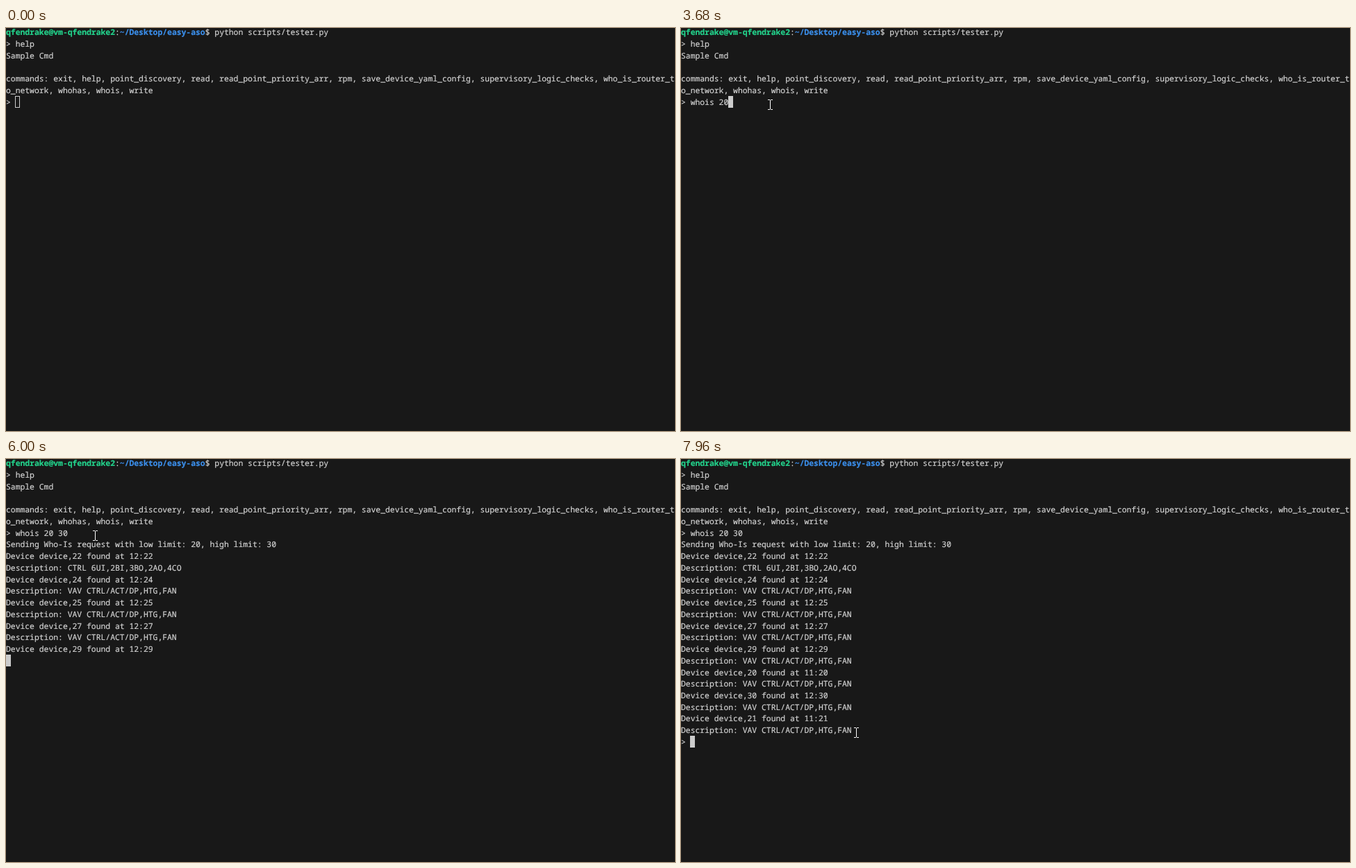
Write an HTML page that moves like this. It is 963 px wide and 581 px high and loops after 8000 ms.

```html
<!DOCTYPE html>
<html lang="en">
<head>
<meta charset="utf-8">
<title>Terminal session</title>
<style>
html, body { margin: 0; width: 100%; height: 100%; overflow: hidden; background: #181818; }
#stage { position: relative; width: 963px; height: 581px; overflow: hidden; }
#stage > * { position: absolute; left: 0; top: 0; }
#screen {
  margin: 0; top: -.7px; color: #d2d2d2; white-space: pre;
  font: 11.39px/16.73px "Noto Sans Mono", "DejaVu Sans Mono", monospace;
  text-rendering: geometricPrecision; font-variant-ligatures: none;
  -webkit-text-stroke: .2px;
}
#screen b { color: #23d18b; }
#screen b + b { color: #3b8eea; }
#selection { background: #264f78; }
#caret { box-sizing: border-box; border: 1px solid #ccc; }
#caret.focused { background: #ccc; }
</style>
</head>
<body>
<div id="stage">
  <div id="selection"></div>
  <div id="caret"></div>
  <pre id="screen"><b>qfendrake@vm-qfendrake2</b>:<b>~/Desktop/easy-aso</b>$ python scripts/tester.py
&gt; help
Sample Cmd

commands: exit, help, point_discovery, read, read_point_priority_arr, rpm, save_device_yaml_config, supervisory_logic_checks, who_is_router_t
o_network, whohas, whois, write
<span id="session"></span></pre>
  <svg id="mouse" width="9" height="17" fill="none">
    <path d="M1 1.5H4M5 1.5H8M4.5 2V15M1 15.5H4M5 15.5H8" stroke="#fff"/>
  </svg>
</div>
<script>
const CELL = 6.83, ROW = 16.73, TOP = -2.4, TICK = 40, LOOP = 8000;
const ENTRY = 40, FOCUS = 720, SELECT = 840, ENTER = 4440, SENT = 4480, REPLY = 5800;
const $ = id => document.getElementById(id);
const session = $('session'), caret = $('caret'), selection = $('selection'), mouse = $('mouse');
const clamp = (v, lo, hi) => Math.min(hi, Math.max(lo, v));

// Keys are evenly spaced from the first to the last of each burst.
const bursts = [
  { text: 'who', first: 1760, last: 1920 },
  { text: 'is ', first: 2080, last: 2240 },
  { text: '20 ', first: 3480, last: 3760 },
  { text: '30', first: 3960, last: 4160 }
];

const moves = [
  { from: ENTRY, to: SELECT, x: 142, y: 107 },
  { from: 1000, to: 1240, x: 128, y: 114 },
  { from: 1360, to: 1480, x: 128, y: 110 },
  { from: 7040, to: 7240, x: 171, y: 328 },
  { from: 7240, to: 7480, x: 66, y: 386 },
  { from: 7480, to: 7960, x: 252, y: 394 }
];

const devices = [22, 24, 25, 27, 29, 20, 30, 21];
const replies = devices.flatMap((id, i) => [
  `Device device,${id} found at ${id < 22 ? 11 : 12}:${id}`,
  'Description: ' + (i ? 'VAV CTRL/ACT/DP,HTG,FAN' : 'CTRL 6UI,2BI,3BO,2AO,4CO')
]);

function typed(t) {
  return bursts.map(({ text, first, last }) => {
    const gap = (last - first) / (text.length - 1);
    return text.slice(0, clamp(Math.floor((t - first) / gap) + 1, 0, text.length));
  }).join('');
}

// Six devices answer in quick succession, the others more slowly.
function replyCount(t) {
  const quick = clamp(Math.floor((t - REPLY) / 48) + 1, 0, 6);
  const slow = Math.floor((t - REPLY - 240) / 160);
  return quick + clamp(slow, 0, devices.length - 6);
}

function sessionLines(t) {
  const lines = ['> ' + typed(t)];
  if (t >= SENT) lines.push('Sending Who-Is request with low limit: 20, high limit: 30');
  const n = replyCount(t), done = n === devices.length;
  // Each reply prints the pending description and the next device.
  lines.push(...replies.slice(0, done ? replies.length : Math.max(0, 2 * n - 1)));
  if (t >= ENTER) lines.push(done ? '> ' : '');
  return lines;
}

function pointerAt(t) {
  let x = 763, y = 408;
  for (const m of moves) {
    const k = clamp((t - m.from) / (m.to - m.from), 0, 1), ease = k * k * (3 - 2 * k);
    x += (m.x - x) * ease;
    y += (m.y - y) * ease;
  }
  return [Math.round(x), Math.round(y)];
}

function place(el, col, row, cols) {
  el.style.left = Math.floor(col * CELL) + 'px';
  el.style.top = TOP + row * ROW + 'px';
  el.style.width = Math.ceil(cols * CELL) + 'px';
  el.style.height = ROW + 'px';
}

function render(t) {
  const lines = sessionLines(t);
  session.textContent = lines.join('\n');
  place(caret, lines[lines.length - 1].length, 5 + lines.length, 1);
  caret.className = t >= FOCUS ? 'focused' : '';
  selection.hidden = t < SELECT || t >= bursts[0].first;

  const [x, y] = pointerAt(t);
  mouse.style.visibility = t < ENTRY ? 'hidden' : 'visible';
  mouse.style.left = x - 4 + 'px';
  mouse.style.top = y - 8 + 'px';
}

place(selection, 19, 5, 5);
const start = performance.now();
let last = -1;
function loop() {
  const t = Math.floor((performance.now() - start) % LOOP / TICK) * TICK;
  if (t !== last) render(last = t);
  requestAnimationFrame(loop);
}
loop();
</script>
</body>
</html>
```
